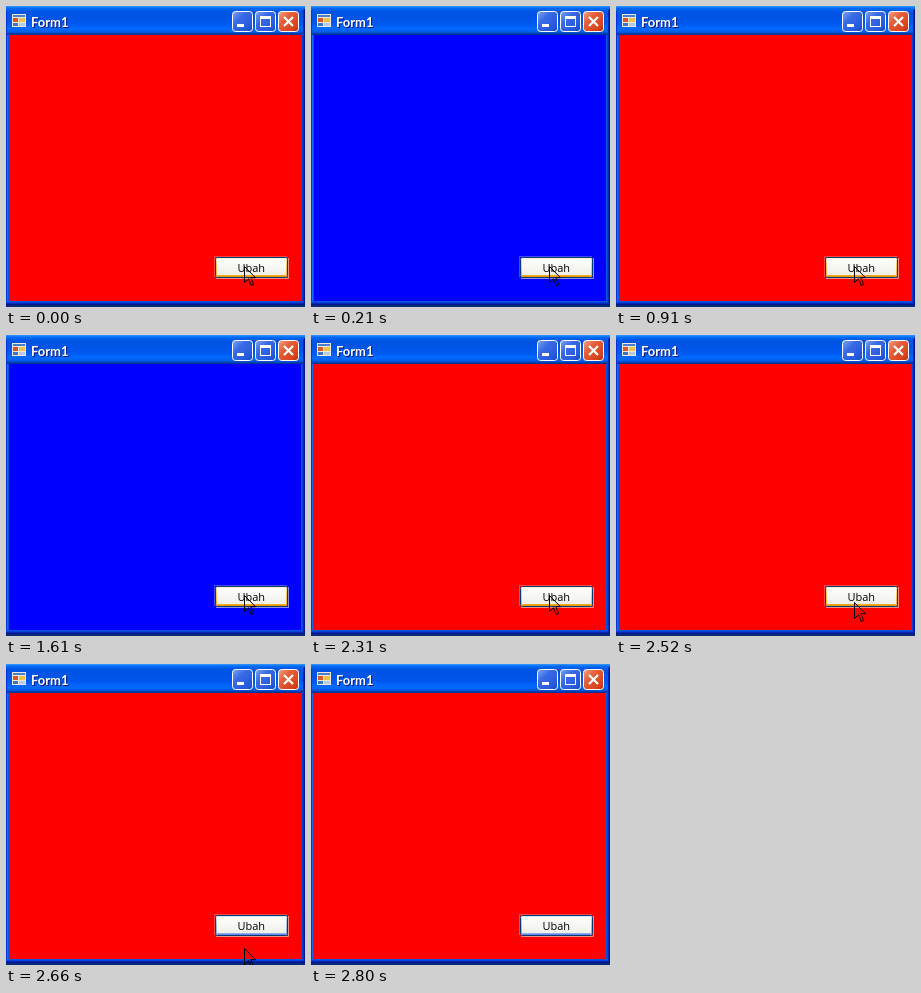
Recreate the animation shown at these times as an HTML page. Size 299 by 301 pixels, loop 3.22 s.

```html
<!DOCTYPE html>
<html lang="id">
<head>
<meta charset="utf-8">
<title>Form1</title>
<style>
  html, body { margin: 0; width: 100%; height: 100%; overflow: hidden; background: #0a2a78; }
  svg { display: block; width: 299px; height: 301px; }
  .title { font: bold 13px Lato, "Open Sans", sans-serif; }
  .label { font: 11px "Open Sans", "Noto Sans", sans-serif; }
</style>
</head>
<body>
<svg viewBox="0 0 299 301" shape-rendering="crispEdges">
  <defs>
    <linearGradient id="bar" x2="0" y2="1">
      <stop offset="0" stop-color="#0058e6"/>
      <stop offset=".04" stop-color="#3593ff"/>
      <stop offset=".08" stop-color="#127dff"/>
      <stop offset=".12" stop-color="#0268f4"/>
      <stop offset=".2" stop-color="#0057e5"/>
      <stop offset=".26" stop-color="#0054e3"/>
      <stop offset=".56" stop-color="#0055eb"/>
      <stop offset=".66" stop-color="#005bf5"/>
      <stop offset=".78" stop-color="#026afe"/>
      <stop offset=".87" stop-color="#0262ef"/>
      <stop offset=".92" stop-color="#0052d6"/>
      <stop offset=".95" stop-color="#0040ab"/>
      <stop offset="1" stop-color="#003092"/>
    </linearGradient>
    <linearGradient id="blue" x2="1" y2="1">
      <stop offset="0" stop-color="#7fa6f4"/>
      <stop offset=".35" stop-color="#3a6be6"/>
      <stop offset=".8" stop-color="#2458dc"/>
      <stop offset="1" stop-color="#1743b8"/>
    </linearGradient>
    <linearGradient id="red" x2="1" y2="1">
      <stop offset="0" stop-color="#f0a48c"/>
      <stop offset=".35" stop-color="#e5603c"/>
      <stop offset=".8" stop-color="#d8421a"/>
      <stop offset="1" stop-color="#b02c08"/>
    </linearGradient>
    <linearGradient id="face" x2="0" y2="1">
      <stop offset="0" stop-color="#fff"/>
      <stop offset=".85" stop-color="#f0f0ea"/>
      <stop offset="1" stop-color="#dcd8cc"/>
    </linearGradient>
    <linearGradient id="hot" x2="0" y2="1">
      <stop offset="0" stop-color="#fff0cf"/>
      <stop offset=".12" stop-color="#fdd889"/>
      <stop offset=".85" stop-color="#f8b330"/>
      <stop offset="1" stop-color="#e59700"/>
    </linearGradient>
    <linearGradient id="focus" x2="0" y2="1">
      <stop offset="0" stop-color="#cee7ff"/>
      <stop offset=".12" stop-color="#bcd4f6"/>
      <stop offset=".85" stop-color="#89ade4"/>
      <stop offset="1" stop-color="#6982ee"/>
    </linearGradient>
  </defs>

  <!-- window frame -->
  <rect y="-1" width="299" height="30" fill="url(#bar)"/>
  <path d="M.5 5V299" stroke="#0831d9"/>
  <path d="M1.5 29V298" stroke="#166aee"/>
  <path d="M2.5 29V297" stroke="#0855dd"/>
  <path d="M0 295.5H295.5V29" fill="none" stroke="#0855dd"/>
  <path d="M0 296.5H296.5V29" fill="none" stroke="#0441d8"/>
  <path d="M0 297.5H297.5V4" fill="none" stroke="#0029b8"/>
  <path d="M0 298.5H298.5V3" fill="none" stroke="#00138c"/>
  <rect id="client" x="3" y="29" width="292" height="266"/>

  <!-- form icon -->
  <g>
    <rect x="6" y="8" width="14" height="13" fill="#ece9d8"/>
    <rect x="7" y="9" width="12" height="2" fill="#4a7fd0"/>
    <rect x="7" y="12" width="5" height="4" fill="#d8572c"/>
    <rect x="13" y="12" width="6" height="4" fill="#f2c14a"/>
    <rect x="7" y="17" width="5" height="3" fill="#3f74c8"/>
    <rect x="13" y="17" width="6" height="3" fill="#b9c9e6"/>
  </g>
  <g class="title">
    <text x="26" y="22" fill="#0a1883">Form1</text>
    <text x="25" y="21" fill="#fff">Form1</text>
  </g>

  <!-- caption buttons -->
  <g stroke="#fff" shape-rendering="auto">
    <rect x="226.5" y="5.5" width="20" height="20" rx="3" fill="url(#blue)"/>
    <rect x="249.5" y="5.5" width="20" height="20" rx="3" fill="url(#blue)"/>
    <rect x="272.5" y="5.5" width="20" height="20" rx="3" fill="url(#red)"/>
    <path d="M278 11L287 20M287 11L278 20" stroke-width="2.2"/>
  </g>
  <rect x="231" y="18" width="7" height="3" fill="#fff"/>
  <path d="M254 10H265V21H254ZM255 13V20H264V13Z" fill="#fff" fill-rule="evenodd"/>

  <!-- push button -->
  <g shape-rendering="auto">
    <path d="M208.5 271V250.5H281" fill="none" stroke="#ece9d8" stroke-opacity=".3"/>
    <path d="M210 272.5H282.5V252" fill="none" stroke="#ece9d8" stroke-opacity=".6"/>
    <rect x="209.5" y="251.5" width="72" height="20" rx="2" fill="url(#face)" stroke="#003c74"/>
    <g id="ring" fill="none">
      <rect x="210.5" y="252.5" width="70" height="18" rx="1"/>
      <path d="M211 269.5H280"/>
    </g>
    <text class="label" x="231.5" y="266">Ubah</text>
  </g>

  <path id="arrow" fill="none" stroke="#000" shape-rendering="auto"
    d="M.5 .5V16.5L4.5 12.8L7.3 19.5L9.7 18.5L6.8 11.7H11.5Z"/>
</svg>
<script>
  const RED = "#f00", BLUE = "#00f", LOOP = 3220;
  // start ms, form colour, pointer height (null = away)
  const steps = [
    [0, RED, 260],
    [210, BLUE, 260],
    [910, RED, 260],
    [1610, BLUE, 260],
    [2310, RED, 260],
    [2520, RED, 267],
    [2590, RED, 275],
    [2660, RED, 284],
    [2730, RED, 293],
    [2800, RED, null]
  ];
  const [client, ring, arrow] = ["client", "ring", "arrow"].map(id => document.getElementById(id));
  const start = performance.now();

  function draw(now) {
    const t = Math.max(0, now - start) % LOOP;
    const [, colour, y] = steps.filter(s => s[0] <= t).pop();
    const hover = y !== null && y < 273;
    client.setAttribute("fill", colour);
    ring.setAttribute("stroke", hover ? "url(#hot)" : "url(#focus)");
    ring.lastElementChild.setAttribute("stroke", hover ? "#f0a820" : "#89ade4");
    arrow.setAttribute("visibility", y === null ? "hidden" : "visible");
    arrow.setAttribute("transform", `translate(238 ${y ?? 301})`);
    requestAnimationFrame(draw);
  }
  draw(start);
</script>
</body>
</html>
```
